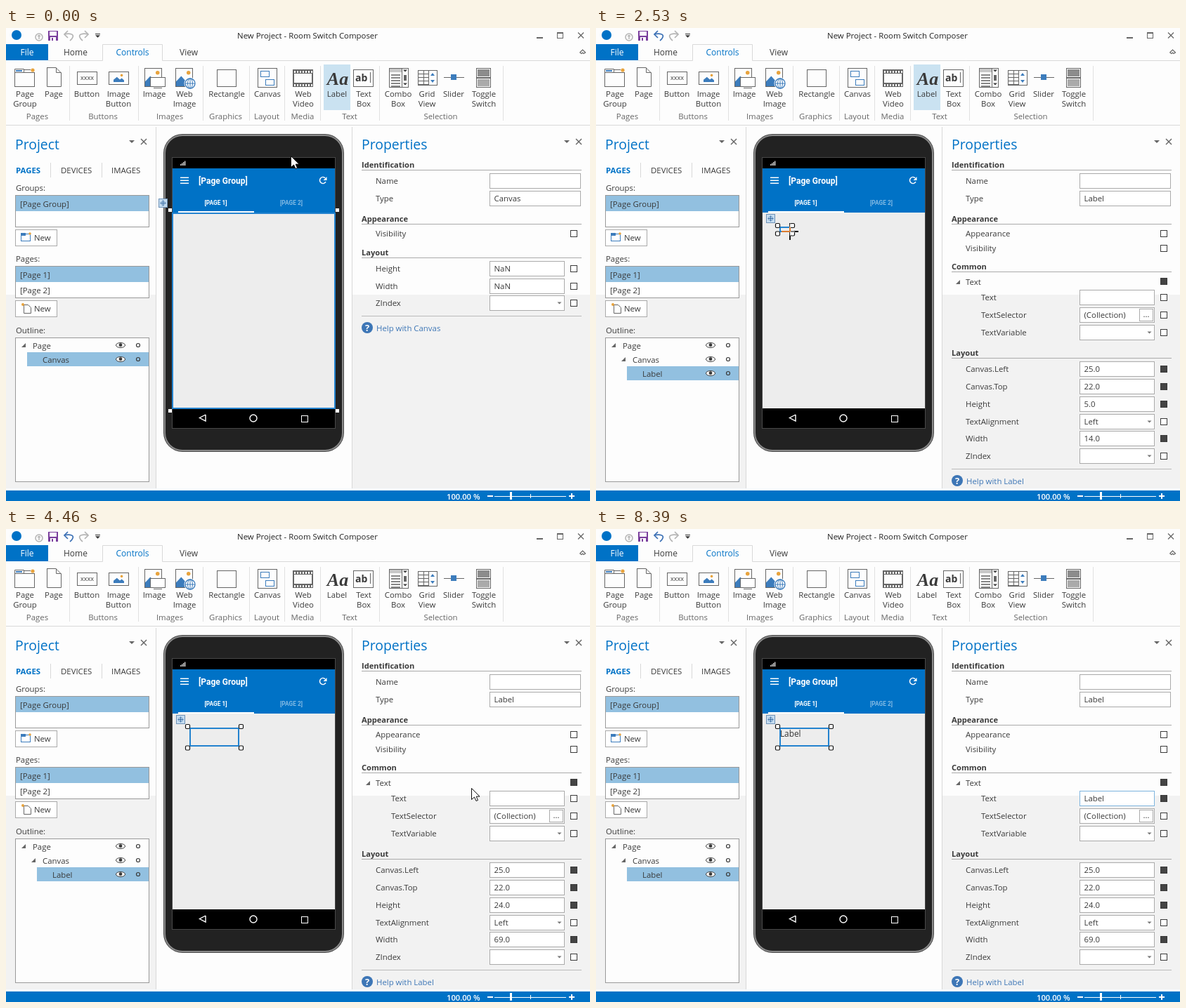
These frames come from a looping animation (831 by 674 pixels, 8490 ms). An HTML page with a canvas:

```html
<!DOCTYPE html>
<html lang="en">
<head>
<meta charset="utf-8">
<title>Designer demo</title>
<style>
html, body { margin: 0; width: 100%; height: 100%; overflow: hidden; background: #fdfdfd; }
canvas { display: block; width: 831px; height: 674px; }
</style>
</head>
<body>
<canvas id="stage" width="831" height="674"></canvas>
<script>
const g = document.getElementById('stage').getContext('2d');
const LOOP = 8490;
const BLUE = '#0072c6', INK = '#3a3a3a', GREY = '#666', PALE = '#d9d9d9', PAPER = '#fdfdfd';
const PICK = '#92c0e0', ICON = '#3c7cbc', SUN = '#e8a33d', OFF = '#b4b4b4';
const UI = '"Open Sans", "Noto Sans", sans-serif';

// Drawing helpers
function rect(x, y, w, h, color) {
  g.fillStyle = color;
  g.fillRect(x, y, w, h);
}
function box(x, y, w, h, stroke, fill) {
  if (fill) rect(x, y, w, h, fill);
  g.strokeStyle = stroke;
  g.lineWidth = 1;
  g.strokeRect(x + 0.5, y + 0.5, w - 1, h - 1);
}
function trace(points, closed) {
  g.beginPath();
  for (let i = 0; i < points.length; i += 2) g.lineTo(points[i], points[i + 1]);
  if (closed) g.closePath();
}
function line(color, width, ...points) {
  trace(points);
  g.strokeStyle = color;
  g.lineWidth = width;
  g.stroke();
}
function poly(color, ...points) {
  trace(points, true);
  g.fillStyle = color;
  g.fill();
}
function disc(x, y, r, color) {
  g.beginPath();
  g.arc(x, y, r, 0, 7);
  g.fillStyle = color;
  g.fill();
}
function arc(x, y, r, color, width = 1, from = 0, to = Math.PI * 2) {
  g.beginPath();
  g.arc(x, y, r, from, to);
  g.strokeStyle = color;
  g.lineWidth = width;
  g.stroke();
}
function text(s, x, y, { color = INK, size = 11.4, weight = 400, align = 'left', font = UI } = {}) {
  g.font = `${weight} ${size}px ${font}`;
  g.fillStyle = color;
  g.textAlign = align;
  g.fillText(s, x, y);
}
function cross(x, y, r, color, width = 1.3) {
  line(color, width, x - r, y - r, x + r, y + r);
  line(color, width, x + r, y - r, x - r, y + r);
}
function dropArrow(x, y, r = 4, color = GREY) {
  poly(color, x - r, y - r / 2, x + r, y - r / 2, x, y + r / 2);
}
function picture(x, y, w, h) {
  poly(ICON, x, y + h, x, y + h * .72, x + w * .32, y + h * .4, x + w * .6, y + h * .7, x + w * .78, y + h * .55, x + w, y + h * .8, x + w, y + h);
  disc(x + w * .77, y + h * .2, Math.max(1.8, w * .12), SUN);
}

// Title bar and tabs
function curvedArrow(x, dir, color) {
  g.beginPath();
  g.moveTo(x, 9);
  g.bezierCurveTo(x + dir * 8, 7, x + dir * 14, 9, x + dir * 12, 13);
  g.quadraticCurveTo(x + dir * 11, 16, x + dir * 8, 18);
  g.strokeStyle = color;
  g.lineWidth = 1.7;
  g.stroke();
  line(color, 1.7, x + dir * 5, 4, x, 9, x + dir * 5, 14);
}
function drawTitleBar(canUndo) {
  disc(15, 10, 7, BLUE);
  arc(47, 13, 5, OFF, 1.5);
  line(OFF, 1.5, 47, 16, 47, 10);
  line(OFF, 1.2, 45, 12, 47, 10, 49, 12);
  box(60, 4, 14, 14, '#7a3e9d', '#7a3e9d');
  rect(62, 5, 10, 6, '#fff');
  rect(63, 13, 8, 5, '#fff');
  rect(65, 14, 2, 4, '#7a3e9d');
  curvedArrow(83, 1, canUndo ? '#3a6fb4' : OFF);
  curvedArrow(117, -1, OFF);
  rect(127, 8, 7, 1, '#333');
  dropArrow(130.5, 12, 3.5, '#333');
  text('New Project - Room Switch Composer', 429, 15, { color: '#222', align: 'center' });
  rect(755, 13, 9, 2, GREY);
  box(784, 6, 9, 9, GREY);
  rect(784, 6, 9, 2, GREY);
  cross(818, 10.5, 4, GREY, 1.3);

  rect(0, 23, 60, 23, BLUE);
  line(PALE, 1, 60, 46.5, 137.5, 46.5, 137.5, 23.5, 222.5, 23.5, 222.5, 46.5, 831, 46.5);
  const tab = (s, x, color) => text(s, x, 39, { color, align: 'center', size: 12 });
  tab('File', 30, '#fff');
  tab('Home', 99, INK);
  tab('Controls', 180, BLUE);
  tab('View', 260, INK);
  line(GREY, 1.2, 816.5, 35, 820.5, 31, 824.5, 35, 822, 36.5, 820.5, 35, 819, 36.5, 816.5, 35);
}

// Ribbon
function drawRibbonIcons() {
  box(12, 63, 29, 21, GREY, PAPER);
  line(GREY, 1, 12.5, 64, 12.5, 58.5, 25.5, 58.5, 25.5, 63);
  line(GREY, 1, 25.5, 59.5, 35, 59.5);
  rect(14, 60, 9, 2, ICON);
  disc(38, 60, 2.6, SUN);
  line(GREY, 1, 58.5, 56.5, 71, 56.5, 78.5, 64, 78.5, 83.5, 58.5, 83.5, 58.5, 56);
  line(GREY, 1, 71.5, 56.5, 71.5, 63.5, 78.5, 63.5);

  box(101, 62, 29, 19, GREY);
  text('xxxx', 115.5, 74, { size: 9, align: 'center' });
  box(146, 62, 29, 19, GREY);
  picture(153, 65, 15, 12);

  box(197, 57, 25, 27, GREY);
  picture(198, 59, 23, 24);
  box(205, 70, 22, 14, GREY, '#fff');
  rect(210, 85, 12, 1, GREY);
  box(241, 57, 25, 27, GREY);
  picture(242, 59, 23, 24);
  disc(262, 79, 8.5, PAPER);
  arc(262, 79, 7, ICON, 1.3);
  line(ICON, 1, 255, 79, 269, 79);
  line(ICON, 1, 262, 72, 262, 86);
  g.beginPath();
  g.ellipse(262, 79, 3.5, 7, 0, 0, 7);
  g.stroke();

  box(300, 59, 28, 25, GREY);
  box(358, 57, 28, 28, GREY);
  box(362, 61, 13, 9, ICON);
  box(369, 73, 13, 9, ICON);

  rect(408, 59, 29, 25, GREY);
  rect(410, 65, 25, 13, PAPER);
  for (let x = 410; x < 435; x += 4) {
    rect(x, 61, 2, 3, '#fff');
    rect(x, 80, 2, 3, '#fff');
  }

  text('Aa', 472, 81, { size: 26, weight: 'italic 700', align: 'center', font: '"Liberation Serif", serif' });
  box(494, 59, 29, 25, GREY);
  text('ab', 497, 76, { size: 14, weight: 700 });
  rect(518, 63, 1, 15, GREY);

  box(545, 57, 28, 28, GREY);
  rect(546, 58, 17, 5, '#c8c8c8');
  for (let y = 66; y < 84; y += 4) rect(548, y, 13, 2, '#888');
  rect(563, 58, 1, 26, GREY);
  dropArrow(568, 61, 3, INK);
  dropArrow(568, 80, 3, INK);
  rect(566, 67, 4, 8, GREY);
  box(586, 60, 28, 22, GREY);
  for (let y = 65; y < 82; y += 5) rect(587, y, 14, 1, GREY);
  rect(594, 60, 1, 21, GREY);
  rect(601, 60, 1, 21, GREY);
  poly(ICON, 604, 68, 610, 68, 607, 64);
  poly(ICON, 604, 74, 610, 74, 607, 78);

  rect(623, 70, 29, 1, GREY);
  rect(633, 66, 8, 8, ICON);
  for (const y of [57, 71]) {
    box(669, y, 21, 14, GREY);
    rect(671, y + 2, 17, 10, y < 60 ? '#8c8c8c' : '#aaa');
  }
}
function drawRibbon(labelPressed) {
  if (labelPressed) rect(452, 52, 38, 65, '#cae2f1');
  for (const x of [90, 188, 280, 346, 396, 447, 531, 707]) rect(x, 54, 1, 78, '#e1e1e1');
  rect(0, 138, 831, 1, PALE);
  const buttons = [['Page|Group', 27], ['Page', 68], ['Button', 115], ['Image|Button', 160], ['Image', 211],
    ['Web|Image', 254], ['Rectangle', 314], ['Canvas', 372], ['Web|Video', 423], ['Label', 471],
    ['Text|Box', 509], ['Combo|Box', 558], ['Grid|View', 599], ['Slider', 637], ['Toggle|Switch', 680]];
  for (const [name, x] of buttons)
    name.split('|').forEach((word, i) => text(word, x, 98 + i * 14, { align: 'center' }));
  const groups = [['Pages', 44.5], ['Buttons', 138], ['Images', 233], ['Graphics', 312.5], ['Layout', 371],
    ['Media', 422], ['Text', 489], ['Selection', 618.5]];
  for (const [name, x] of groups) text(name, x, 130, { color: GREY, align: 'center' });
  drawRibbonIcons();
}

// Project panel
function panelHead(title, x, arrowX) {
  text(title, x, 173, { size: 19.4, color: BLUE });
  dropArrow(arrowX, 162);
  cross(arrowX + 17, 162, 4, GREY, 1.4);
}
function newButton(y, folder) {
  box(13, y, 60, 24, '#aaa', '#fff');
  text('New', 40, y + 16);
  if (folder) {
    box(21, y + 6, 14, 11, ICON);
    rect(21, y + 5, 7, 4, ICON);
    disc(34, y + 6, 1.8, SUN);
  } else {
    line(GREY, 1, 25.5, y + 6.5, 31.5, y + 6.5, 35.5, y + 10.5, 35.5, y + 18.5, 25.5, y + 18.5, 25.5, y + 6);
    disc(24, y + 6, 2, SUN);
  }
}
function outlineRow(name, x, y, selected, open) {
  if (selected) rect(x - 22, y - 10, 203 - x + 22, 20, PICK);
  if (open) poly(GREY, x - 16, y + 3, x - 10, y + 3, x - 10, y - 3);
  text(name, x, y + 5);
  g.beginPath();
  g.ellipse(163, y, 6.5, 3.5, 0, 0, 7);
  g.fillStyle = '#fff';
  g.fill();
  g.strokeStyle = INK;
  g.lineWidth = 1;
  g.stroke();
  disc(163, y - .3, 2.4, INK);
  arc(188, y, 2.5, INK, 1.2);
}
function drawProject(hasLabel) {
  panelHead('Project', 13, 179);
  text('PAGES', 14, 207, { color: BLUE, weight: 700 });
  text('DEVICES', 78, 207);
  text('IMAGES', 150, 207);
  rect(63, 192, 1, 21, PALE);
  rect(136, 192, 1, 21, PALE);
  text('Groups:', 14, 232);
  box(13, 238, 191, 46, '#999', '#fff');
  rect(14, 239, 189, 22, PICK);
  text('[Page Group]', 20, 255);
  newButton(287, true);
  text('Pages:', 14, 333);
  box(13, 339, 191, 46, '#999', '#fff');
  rect(14, 340, 189, 22, PICK);
  text('[Page 1]', 20, 356);
  text('[Page 2]', 20, 378);
  newButton(388, false);
  text('Outline:', 14, 435);
  box(13, 441, 191, 206, '#999', PAPER);
  outlineRow('Page', 38, 452, false, true);
  outlineRow('Canvas', 52, 472, !hasLabel, hasLabel);
  if (hasLabel) outlineRow('Label', 66, 492, true, false);
}

// Properties panel
function section(name, y) {
  text(name, 506, y, { weight: 700, size: 11.1 });
  rect(506, y + 3, 313, 1, '#aaa');
}
function check(y, filled) {
  box(803, y - 5, 10, 10, INK, filled ? '#444' : '#fff');
}
function field(name, y, { value = '', kind = 'text', x = 526, wide = false, set = false, focus = false } = {}) {
  text(name, x, y + 4);
  box(688, y - 11, wide ? 130 : 107, 22, focus ? '#7db4de' : '#aaa', '#fff');
  text(value, 694.5, y + 4);
  if (kind === 'combo') dropArrow(787.5, y, 3, '#777');
  if (kind === 'pick') {
    box(773, y - 9, 20, 18, '#aaa', '#fff');
    text('...', 783, y + 3, { align: 'center' });
  }
  if (!wide) check(y, set);
}
function help(name, y) {
  rect(506, y - 17, 313, 1, '#bbb');
  disc(514, y, 8, '#3d76b6');
  text('?', 514, y + 5, { color: '#fff', size: 13, weight: 700, align: 'center' });
  text('Help with ' + name, 527, y + 5, { color: '#3d76b6' });
}
function drawProperties(s) {
  panelHead('Properties', 506, 798);
  section('Identification', 199);
  field('Name', 218, { wide: true });
  field('Type', 243, { wide: true, value: s.hasLabel ? 'Label' : 'Canvas' });
  section('Appearance', 276);
  if (!s.hasLabel) {
    text('Visibility', 526, 297);
    check(293);
    section('Layout', 324);
    field('Height', 343, { value: 'NaN' });
    field('Width', 368, { value: 'NaN' });
    field('ZIndex', 392, { kind: 'combo' });
    help('Canvas', 427);
    return;
  }
  text('Appearance', 526, 297);
  check(293);
  text('Visibility', 526, 318);
  check(314);
  section('Common', 344);
  poly(GREY, 512, 365, 518, 365, 518, 359);
  text('Text', 526, 366);
  check(361, true);
  field('Text', 384, { x: 548, value: s.typed, set: s.typed !== '', focus: s.focus });
  if (s.caret) rect(Math.round(694 + g.measureText(s.typed).width), 375, 1, 16, '#000');
  field('TextSelector', 409, { x: 548, value: '(Collection)', kind: 'pick' });
  field('TextVariable', 434, { x: 548, kind: 'combo' });
  section('Layout', 467);
  field('Canvas.Left', 486, { value: '25.0', set: true });
  field('Canvas.Top', 511, { value: '22.0', set: true });
  field('Height', 536, { value: s.h.toFixed(1), set: true });
  field('TextAlignment', 561, { value: 'Left', kind: 'combo' });
  field('Width', 585, { value: s.w.toFixed(1), set: true });
  field('ZIndex', 610, { kind: 'combo' });
  help('Label', 645);
}

// Phone preview
function moveGrip(x, y) {
  box(x, y, 13, 13, '#6f93b8', '#c5dcf0');
  const c = '#3a6ea5', cx = x + 6.5, cy = y + 6.5;
  line(c, 1, cx - 4, cy, cx + 4, cy);
  line(c, 1, cx, cy - 4, cx, cy + 4);
  arc(cx, cy, 3, c, .6);
}
function shell(inset, color) {
  g.beginPath();
  g.roundRect(224 + inset, 151 + inset, 257 - inset * 2, 453 - inset * 2, 27 - inset);
  g.fillStyle = color;
  g.fill();
}
function drawPhone(s) {
  shell(0, '#4a4a4a');
  shell(1, '#8a8a8a');
  shell(3, '#222');
  box(236, 184, 233, 387, '#484848', '#000');
  for (let i = 0; i < 4; i++) rect(248 + i * 2, 194 - i * 1.5, 1.3, 2 + i * 1.5, '#ddd');
  rect(237, 200, 231, 64, BLUE);
  for (const y of [213, 217, 221]) rect(248, y - .5, 12, 1.5, '#fff');
  const roboto = { color: '#fff', weight: 700, font: 'Roboto, sans-serif' };
  text('[Page Group]', 274, 222, { ...roboto, size: 12 });
  arc(451, 217, 4.5, '#fff', 1.5, .5, 5.5);
  poly('#fff', 456.5, 212, 456.5, 217, 451.5, 217);
  text('[PAGE 1]', 298.5, 252, { ...roboto, size: 8.3, align: 'center' });
  text('[PAGE 2]', 406, 252, { ...roboto, size: 8.3, align: 'center', color: '#80b9e3' });
  rect(237, 263, 231, 279, '#ededed');
  line('#fff', 1.4, 284, 551, 284, 560, 275.5, 555.5, 284, 551);
  arc(352, 556, 5, '#fff', 1.4);
  box(420, 552, 10, 10, '#fff');

  g.strokeStyle = '#2483cf';
  g.lineWidth = 2;
  if (!s.hasLabel) g.strokeRect(237, 264, 231, 278);
  rect(245, 261, 108, 2, '#fff');
  if (!s.hasLabel) {
    for (const x of [231, 469]) for (const y of [257, 543]) rect(x, y, 5, 5, '#fff');
    moveGrip(217, 243);
    return;
  }
  g.strokeRect(262, 284, s.w, s.h + 1);
  moveGrip(242, 265);
  text(s.typed, 262, 296, { size: 11.8, color: '#333' });
  for (const x of [258.5, 265.5 + s.w]) for (const y of [281.5, 288 + s.h]) {
    g.beginPath();
    g.roundRect(x - 3, y - 3, 6, 6, 1.5);
    g.fillStyle = '#fff';
    g.fill();
    g.strokeStyle = '#111';
    g.lineWidth = 1.2;
    g.stroke();
  }
}

function drawStatus() {
  rect(0, 659, 831, 15, BLUE);
  text('100.00 %', 627, 671.5, { color: '#fff', weight: 600, size: 11.2 });
  rect(685, 666, 8, 2, '#fff');
  rect(695, 667, 102, 1, '#fff');
  rect(717, 661, 3, 11, '#fff');
  rect(746, 664, 1, 6, '#fff');
  rect(801, 666, 8, 2, '#fff');
  rect(804, 663, 2, 8, '#fff');
}

function drawPointer({ x, y, kind }) {
  if (kind === 'plus') {
    g.globalCompositeOperation = 'difference';
    rect(x - 12, y - 1, 24, 2, '#fff');
    rect(x - 1, y - 12, 2, 11, '#fff');
    rect(x - 1, y + 1, 2, 11, '#fff');
    g.globalCompositeOperation = 'source-over';
  } else if (kind === 'arrow') {
    const shape = [0, 0, 0, 16, 4, 12.5, 6.5, 18, 9, 17, 6.7, 11.6, 11.5, 11.6].map((v, i) => v + .5 + (i % 2 ? y : x));
    poly('#fff', ...shape);
    g.strokeStyle = '#111';
    g.lineWidth = 1;
    g.stroke();
  }
}

// Timeline: each move advances in a fixed count of hard steps
function steps(t, from, to, count) {
  return t < from ? 0 : Math.min(count, Math.floor((t - from) / (to - from) * (count - 1) + 1e-6) + 1);
}
const ease = p => (p + p * p * (3 - 2 * p)) / 2;
const mix = (a, b, p) => Math.round(a + (b - a) * p);

function pointerAt(t, w, h) {
  const move = (a, b, p, kind) => ({ x: mix(a[0], b[0], p), y: mix(a[1], b[1], p), kind });
  if (t < 1170) return move([405, 182], [293, 243], ease(steps(t, 120, 1040, 8) / 8), 'arrow');
  if (t < 2380) {
    const p = move([293, 243], [262, 285], ease(steps(t, 1170, 2120, 7) / 7));
    p.kind = p.y > 263 ? 'plus' : 'arrow';
    return p;
  }
  if (t < 3880) return { x: 262 + w, y: 285 + h, kind: 'plus' };
  const k = steps(t, 3880, 4740, 7);
  return move([331, 309], [768, 388], ease(k / 7), k < 6 ? 'arrow' : 'none');
}
function stateAt(t) {
  const size = ease(steps(t, 2380, 3360, 8) / 8);
  const w = mix(0, 69, size), h = mix(0, 24, size);
  const within = (a, b) => t >= a && t < b;
  return {
    w, h,
    hasLabel: t >= 2380,
    labelPressed: t < 3880,
    canUndo: within(1170, 5150) || t >= 6260,
    focus: t >= 4600,
    typed: 'Label'.slice(0, Math.max(0, steps(t, 6130, 6780, 6) - 1)),
    caret: within(4740, 5150) || within(5730, 6130) || within(6260, 7310) || within(7990, 8390),
    pointer: pointerAt(t, w, h)
  };
}

function draw(t) {
  const s = stateAt(t);
  rect(0, 0, 831, 674, PAPER);
  rect(0, 380, 213, 276, '#f2f2f2');
  rect(493, 380, 338, 276, '#f2f2f2');
  rect(213, 141, 1, 515, PALE);
  rect(492, 141, 1, 515, PALE);
  drawTitleBar(s.canUndo);
  drawRibbon(s.labelPressed);
  drawProject(s.hasLabel);
  drawPhone(s);
  drawProperties(s);
  drawStatus();
  drawPointer(s.pointer);
}

const start = performance.now();
function tick() {
  draw((performance.now() - start) % LOOP);
  requestAnimationFrame(tick);
}
tick();
</script>
</body>
</html>
```
